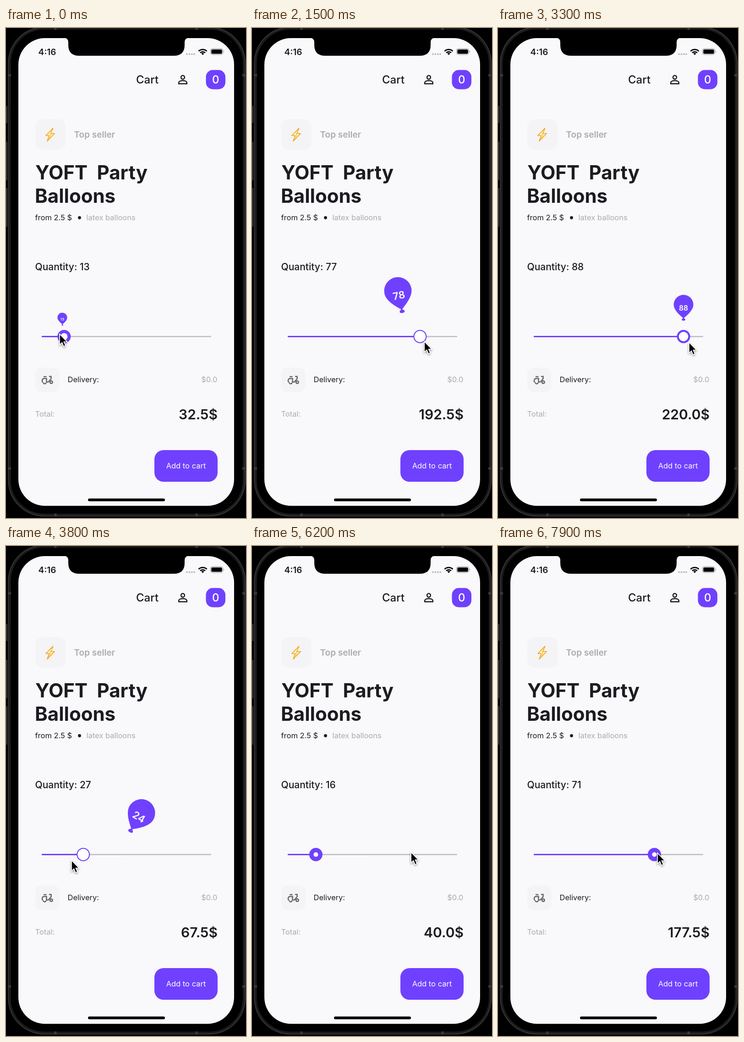
An HTML page for the animation above (8 s loop, 524 px wide and 1068 px high).

```html
<!DOCTYPE html>
<html lang="en">
<head>
<meta charset="utf-8">
<title>Balloon slider</title>
<style>
html, body { margin: 0; width: 100%; height: 100%; overflow: hidden; background: #000; }
svg { display: block; width: 100%; height: 100%; font-family: Inter, Roboto, sans-serif; font-size: 16.5px; fill: #1d1b20; }
text { white-space: pre; }
.w5 { font-weight: 500; }
.w6 { font-weight: 600; }
.title { font-size: 42px; font-weight: 700; }
.gray { fill: #acaaae; }
.tile { fill: #f4f3f5; }
.brand { fill: #6f41ff; }
.light { fill: #fff; }
.end { text-anchor: end; }
.mid { text-anchor: middle; }
.line { fill: none; stroke-width: 2.5; }
#cursor { fill: #000; stroke: #fff; stroke-width: 1.7; filter: drop-shadow(0 2px 2px #0006); }
</style>
</head>
<body>
<svg viewBox="0 0 524 1068">
  <!-- phone body -->
  <rect width="524" height="1068" fill="#000"/>
  <path d="M0 170h3v37H0zM0 248h3v84H0zM0 349h3v84H0z" fill="#303032"/>
  <rect x="5.5" y="-1.5" width="516.5" height="1065" rx="78" fill="#000" stroke="#343436" stroke-width="2.5"/>
  <rect x="8.5" y="1.5" width="510.500" height="1059" rx="75" fill="none" stroke="#1b1b1c" stroke-width="4"/>
  <path d="M4 103h7M4 960h7M516 103h7M516 960h7M108 0v4M416 0v4M108 1058v7M416 1058v7" stroke="#3a3a3c" stroke-width="5"/>
  <rect x="27" y="22" width="471" height="1019.5" rx="58" fill="#f9f8fb"/>
  <path d="M127 21.500Q136 22 136 31V37Q136 60.500 160 60.500H366Q390 60.500 390 37V31Q390 22 399 21.500Z" fill="#000"/>
  <rect x="179" y="1025.500" width="168" height="6" rx="3" fill="#000"/>

  <!-- status bar -->
  <text x="70.500" y="58.500" font-size="19" class="w6">4:16</text>
  <path d="M395 57h.01M400.500 57h.01M405.800 57h.01M411 57h.01" stroke="#bcbbbe" stroke-width="4" stroke-linecap="round"/>
  <path d="M420.500 50.500a13 13 0 0 1 18 0M424 54a8 8 0 0 1 11 0" class="line" style="stroke:#000;stroke-width:2.800"/>
  <path d="M429.500 59l-3-3.200a4.300 4.300 0 0 1 6 0z" fill="#000"/>
  <rect x="446.500" y="45" width="27" height="13" rx="4" fill="none" stroke="#8d8c90"/>
  <rect x="448.300" y="46.800" width="23.400" height="9.400" rx="2.500" fill="#000"/>
  <path d="M475 49.500q2.500 2 0 4z" fill="#8d8c90"/>

  <!-- header -->
  <text x="284" y="121" font-size="24" class="w5">Cart</text>
  <g class="line" stroke="#1d1b20">
    <circle cx="386" cy="107.500" r="3.900"/>
    <path d="M377.200 121.500v-2.300c0-6 17.600-6 17.600 0v2.300z"/>
  </g>
  <rect x="436.500" y="91.500" width="42.500" height="42" rx="15" class="brand"/>
  <text x="457.700" y="121.200" font-size="24" class="light mid w5">0</text>

  <!-- product -->
  <rect x="64" y="199" width="66" height="66.500" rx="16" class="tile"/>
  <path d="M102.500 218.500L87 234.500h7.500L90 246.500l16-16.500h-8z" fill="#fdf3d8" stroke="#f0a30e" stroke-width="1.700" stroke-linejoin="round"/>
  <path d="M101 222l-5 10.500h2.500l-4 8" class="line" style="stroke:#f6c445;stroke-width:1.200"/>
  <text x="148.500" y="239" font-size="19" class="gray w6">Top seller</text>
  <text x="64" y="330" class="title">YOFT</text>
  <text x="198.500" y="330" class="title">Party</text>
  <text x="63" y="381" class="title">Balloons</text>
  <text x="63.500" y="419">from 2.5 $</text>
  <circle cx="160.500" cy="413.500" r="3.400"/>
  <text x="175.500" y="419" class="gray">latex balloons</text>
  <text id="qty" x="63.500" y="528" font-size="21" class="w5"></text>

  <!-- order -->
  <rect x="64" y="740" width="52.500" height="53.500" rx="14" class="tile"/>
  <g class="line" stroke="#68666b">
    <path d="M79 771.500v-3q0-4.500 4.500-4.500h5v7.500h4l6-7v-5h-4.500M82 760h6.500M79 771.500h2"/>
    <path d="M81.500 772.500a3 3 0 0 0 6 0"/>
    <circle cx="98.800" cy="772" r="2.700"/>
  </g>
  <text x="134.500" y="772">Delivery:</text>
  <text x="461.500" y="772" class="gray end">$0.0</text>
  <text x="63.500" y="847" class="gray">Total:</text>
  <text id="total" x="462" y="853" font-size="30" class="end w6"></text>
  <rect x="324" y="920" width="138" height="69" rx="20" class="brand"/>
  <text x="393" y="960" class="light mid">Add to cart</text>

  <!-- slider -->
  <rect x="78" y="671.300" width="370" height="2.500" rx="1" fill="#bdbcbf"/>
  <rect id="fill" x="78" y="671" height="3" rx="1" class="brand"/>
  <g id="thumb"><circle r="14.500" class="brand"/><circle id="hole" class="light"/></g>
  <g id="balloon">
    <path d="M0-7C-6-13-30-30-30-49A30 30 0 0 1 30-49C30-30 6-13 0-7Z" class="brand"/>
    <path d="M0-9C2-7 5.500-6 5.500-3Q5.500 0 0 0T-5.500-3C-5.500-6-2-7 0-9Z" class="brand"/>
    <text id="label" y="-31" font-size="22" class="light mid w6"></text>
  </g>
  <path id="cursor" d="M0 0V23.500L5.300 18.600L8.900 27L13 25.200L9.500 17H16.500Z"/>
</svg>
<script>
const LOOP = 8000, STEP = 100, LEFT = 78, WIDTH = 370, TRACK_Y = 672.5;
const $ = id => document.getElementById(id);

// Each track is a list of [time, value] points joined by straight lines.
const valueKeys = [[-100, 12], [0, 13.2], [350, 14], [800, 36.5], [1600, 84], [1800, 88.4],
  [3440, 88.4], [3800, 24.5], [3840, 19], [3930, 16.2], [4900, 16.2], [5000, 16.6],
  [6400, 16.6], [6401, 71.2]];
const sizeKeys = [[0, .354], [200, 1], [2350, 1], [2400, .873], [2700, 0], [3100, 0], [3380, 1],
  [4900, 1], [5200, 0], [6400, 0], [6650, 1], [7100, 1], [7400, 0]];
const cursorX = [[0, 117], [350, 120], [800, 210], [1600, 400], [1800, 417], [3440, 417],
  [3800, 143], [3900, 129], [4900, 129], [5200, 130], [6000, 347], [7900, 348]];
const cursorY = [[0, 667], [800, 670], [1600, 685], [5200, 685], [6000, 667], [7900, 669]];

function at(keys, t) {
  const i = keys.findIndex(k => k[0] > t);
  if (i < 0) return keys[keys.length - 1][1];
  if (i === 0) return keys[0][1];
  const [t0, a] = keys[i - 1], [t1, b] = keys[i];
  return a + (b - a) * (t - t0) / (t1 - t0);
}

const toX = value => LEFT + WIDTH * value / 100;

// The balloon chases the thumb with an exponential lag.
function trailing(t) {
  let v = at(valueKeys, t - 1200);
  for (let ago = 1200; ago >= 0; ago -= 20) v += (at(valueKeys, t - ago) - v) * .115;
  return v;
}

function draw(t) {
  const value = at(valueKeys, t), size = at(sizeKeys, t);
  const quantity = Math.floor(at(valueKeys, t - 16));
  const x = toX(value), bx = toX(trailing(t));
  const tilt = Math.max(-40, Math.min(40, (bx - x) * .345));
  const lift = 22 + 30 * size ** 2.6;

  $("qty").textContent = "Quantity: " + quantity;
  $("total").textContent = (quantity * 2.5).toFixed(1) + "$";
  $("label").textContent = Math.floor(value);
  $("fill").setAttribute("width", x - LEFT);
  $("thumb").setAttribute("transform", `translate(${x} ${TRACK_Y})`);
  $("hole").setAttribute("r", 5 + 7.4 * size);
  $("balloon").setAttribute("transform",
    `translate(${bx} ${TRACK_Y - lift + 23}) rotate(${tilt}) translate(0 -23) scale(${size})`);
  $("cursor").setAttribute("transform", `translate(${at(cursorX, t)} ${at(cursorY, t)})`);
}

const start = performance.now();
function frame() {
  const t = (performance.now() - start) % LOOP;
  draw(Math.floor(t / STEP) * STEP);
  requestAnimationFrame(frame);
}
frame();
</script>
</body>
</html>
```
